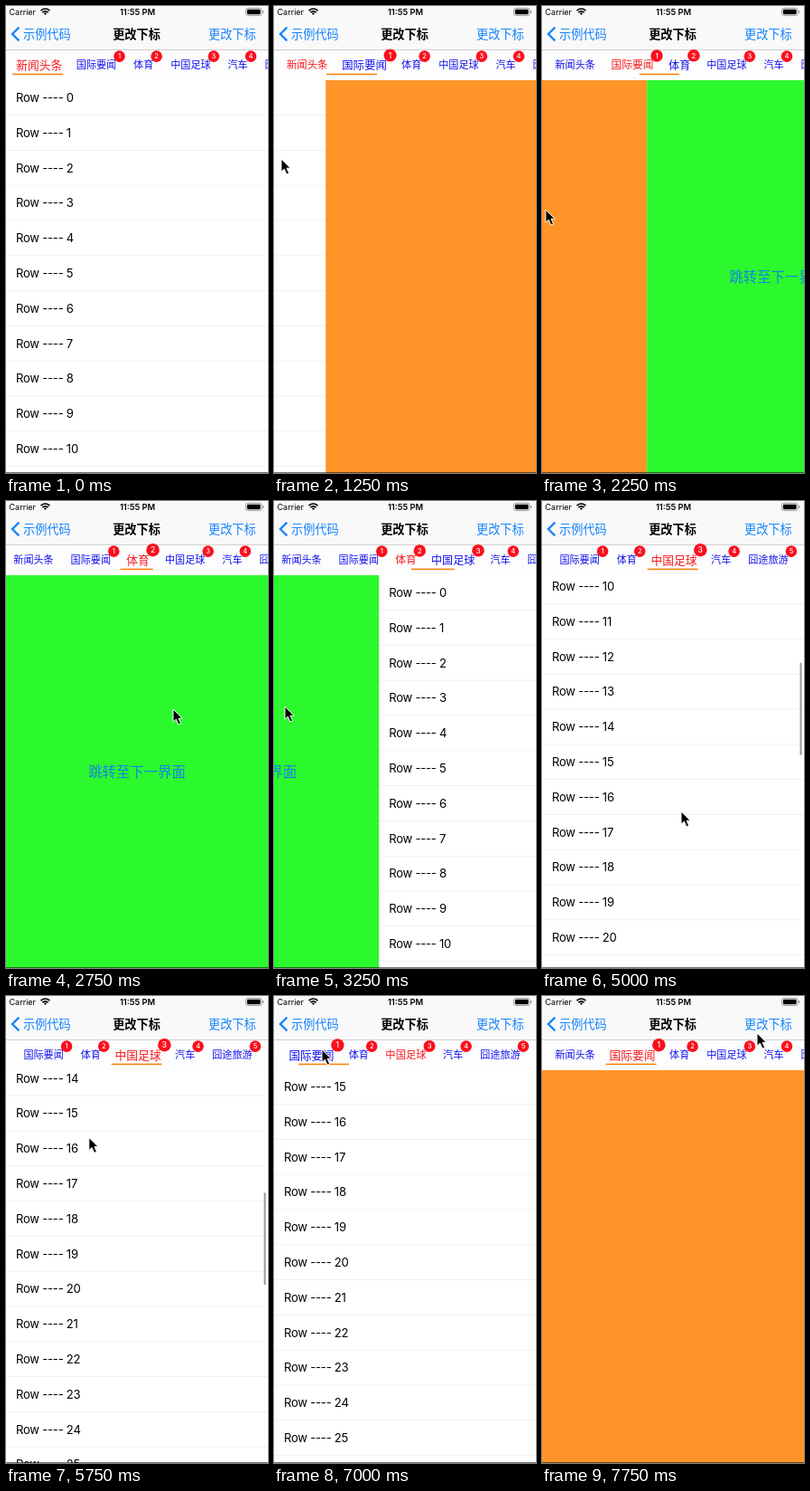
Recreate the animation shown at these times as an HTML page. Size 290x516 px, loop 8000 ms.

```html
<!DOCTYPE html>
<html lang="zh-CN">
<head>
<meta charset="utf-8">
<title>更改下标</title>
<style>
html, body { margin: 0; width: 100%; height: 100%; overflow: hidden; background: #fff; }
svg { display: block; width: 290px; height: 516px; }
text { font-family: Inter, "Noto Sans CJK SC", "Noto Sans CJK", sans-serif; white-space: pre; }
.row { font-size: 13.1px; letter-spacing: -.24px; }
.tab { font-size: 11.1px; text-anchor: middle; }
.num { font-size: 7.5px; text-anchor: middle; fill: #fff; font-weight: 500; }
.nav { font-size: 13.2px; fill: #1683fb; }
.title { fill: #000; font-weight: 600; text-anchor: middle; }
.link { font-size: 15.4px; fill: #1683e6; text-anchor: middle; }
</style>
</head>
<body>
<svg viewBox="0 0 290 516">
  <defs>
    <clipPath id="body"><rect y="82" width="290" height="434"/></clipPath>
  </defs>
  <rect width="290" height="516" fill="#fff"/>
  <g clip-path="url(#body)">
    <g id="pages">
      <g id="listA"></g>
      <rect x="290" y="82" width="290" height="434" fill="#ff9528"/>
      <rect x="580" y="82" width="290" height="434" fill="#2bf92d"/>
      <text class="link" x="725" y="304.6">跳转至下一界面</text>
      <g transform="translate(870)"><g id="listB"></g></g>
    </g>
    <rect id="thumb" x="285.5" width="2" height="102" rx="1" fill="#999"/>
  </g>
  <rect y="515" width="290" height="1" fill="#000" opacity=".53"/>

  <rect width="290" height="48" fill="#f9f9f9"/>
  <rect y="48" width="290" height="1" fill="#cfcfcf"/>
  <rect y="49" width="290" height="33" fill="#fdfdfd"/>
  <g id="tabs">
    <rect id="bar" y="74.6" height="1.6" fill="#ff8410"/>
  </g>

  <text x="3.5" y="9.8" font-size="9">Carrier</text>
  <g fill="none" stroke="#000" stroke-width="1.6">
    <path d="M38.5 5.2Q43.5 .8 48.5 5.2M40.3 7.2Q43.5 4.4 46.7 7.2"/>
    <path d="M41.8 8.1Q43.5 6.8 45.2 8.1L43.5 10Z" fill="#000" stroke="none"/>
  </g>
  <text x="145.5" y="9.8" font-size="9.3" font-weight="600" text-anchor="middle">11:55 PM</text>
  <rect x="265.4" y="2.4" width="17.6" height="8.2" rx="2.2" fill="none" stroke="#888" stroke-width=".8"/>
  <rect x="266.8" y="3.8" width="14.8" height="5.4" rx="1.1"/>
  <path d="M284 5v3q1.3-.3 1.3-1.5T284 5" fill="#888"/>
  <path d="M14.4 23.6L7 31l7.4 7.4" fill="none" stroke="#1683fb" stroke-width="2.3"/>
  <text class="nav" x="19" y="36">示例代码</text>
  <text class="nav title" x="144.5" y="36">更改下标</text>
  <text class="nav" x="224" y="36">更改下标</text>

  <path id="cursor" d="M0 0V14.2L3.3 11.2L5.9 17L8.6 15.8L6.1 10.2H10.3Z" stroke="#fff" stroke-linejoin="round"/>
</svg>
<script>
const STEP = 250, LOOP = 8000, WIDTH = 290, ROW = 38.8, CONTENT = 1790;
const TAB_FONT = 11.1, TAB_GAP = 18.9, TAB_GROW = .15;
const titles = ['新闻头条', '国际要闻', '体育', '中国足球', '汽车', '囧途旅游'];

// All times count steps of STEP ms
const swipes = [2.855, 7.3, 11.3], SWIPE = 3;
const TAP = 27, TAP_SLIDE = 1.31;
const path = [[1, 245, 250], [3, 241, 180], [5, 8, 169], [7, 178, 222], [9, 4, 225], [11, 185, 230],
  [13, 12, 227], [16, 150, 430], [20, 154, 343], [25, 58, 55], [28, 53, 59], [30, 214, 55], [31, 238, 41]];

const $ = id => document.getElementById(id);
const lerp = (a, b, t) => a + (b - a) * t;
const ease = (k, start, span) => {
  const u = Math.min(1, Math.max(0, (k - start) / span));
  return u * u * (3 - 2 * u);
};
const move = (el, x, y) => el.setAttribute('transform', `translate(${x} ${y})`);

function add(parent, tag, attrs, label) {
  const el = document.createElementNS('http://www.w3.org/2000/svg', tag);
  for (const name in attrs) el.setAttribute(name, attrs[name]);
  if (label !== undefined) el.textContent = label;
  return parent.appendChild(el);
}

function fillList(list, count) {
  for (let i = 0; i < count; i++) {
    const y = 82 + i * ROW;
    add(list, 'text', { class: 'row', x: 11, y: y + 24 }, 'Row ---- ' + i);
    add(list, 'rect', { y: y + ROW - .6, width: WIDTH, height: .8, fill: '#eeeef0' });
  }
}
fillList($('listA'), 12);
fillList($('listB'), 46);

let left = 14.5;
const tabs = titles.map((title, i) => {
  const width = title.length * TAB_FONT, mid = left + width / 2;
  left += width + TAB_GAP;
  const g = add($('tabs'), 'g', {});
  const text = add(g, 'text', { class: 'tab', y: 4.2 }, title);
  if (i) {
    const x = width / 2 + 3.3;
    add(g, 'circle', { cx: x, cy: -9.4, r: 6.3, fill: '#fb0f1c' });
    add(g, 'text', { class: 'num', x, y: -6.7 }, i);
  }
  return { g, text, mid, bar: title.length * 10 + 16 };
});

function cursorAt(k) {
  const n = path.findIndex(p => p[0] >= k);
  if (n < 1) return path[0].slice(1);
  const [k0, x0, y0] = path[n - 1], [k1, x1, y1] = path[n];
  const t = ease(k, k0, k1 - k0);
  return [lerp(x0, x1, t), lerp(y0, y1, t)];
}

function draw(k) {
  const jump = ease(k, TAP, TAP_SLIDE);
  const page = jump === 1 ? 1 : swipes.reduce((sum, s) => sum + ease(k, s, SWIPE), 0);
  const scroll = 395 * ease(k, 15, 5) + 188 * ease(k, 20, 4);
  const jumping = jump > 0 && jump < 1;
  const from = Math.floor(page), to = jumping ? 1 : Math.min(from + 1, 3);
  const t = jumping ? jump : page - from;
  const a = tabs[from], b = tabs[to];

  move($('pages'), -WIDTH * page, 0);
  move($('listB'), 0, -scroll);
  $('thumb').setAttribute('y', 83.3 + scroll * 433 / CONTENT);
  $('thumb').setAttribute('opacity', k > 15 && k < 25 ? 1 : 0);

  move($('tabs'), -Math.max(0, a.mid - 146), 0);
  tabs.forEach(({ g, text, mid }, i) => {
    const big = i === from ? 1 - t : i === to ? t : 0;
    g.setAttribute('transform', `translate(${mid} 65) scale(${1 + TAB_GROW * big})`);
    text.setAttribute('fill', i === from ? '#f8181c' : '#1010ee');
  });
  const width = lerp(a.bar, b.bar, t);
  $('bar').setAttribute('x', lerp(a.mid, b.mid, t) - 1.4 - width / 2);
  $('bar').setAttribute('width', width);

  move($('cursor'), ...cursorAt(k));
  $('cursor').setAttribute('visibility', k ? 'visible' : 'hidden');
}

const start = performance.now();
let shown = -1;
function tick(now) {
  const k = Math.floor(Math.max(0, now - start) % LOOP / STEP);
  if (k !== shown) draw(shown = k);
  requestAnimationFrame(tick);
}
draw(0);
requestAnimationFrame(tick);
</script>
</body>
</html>
```
